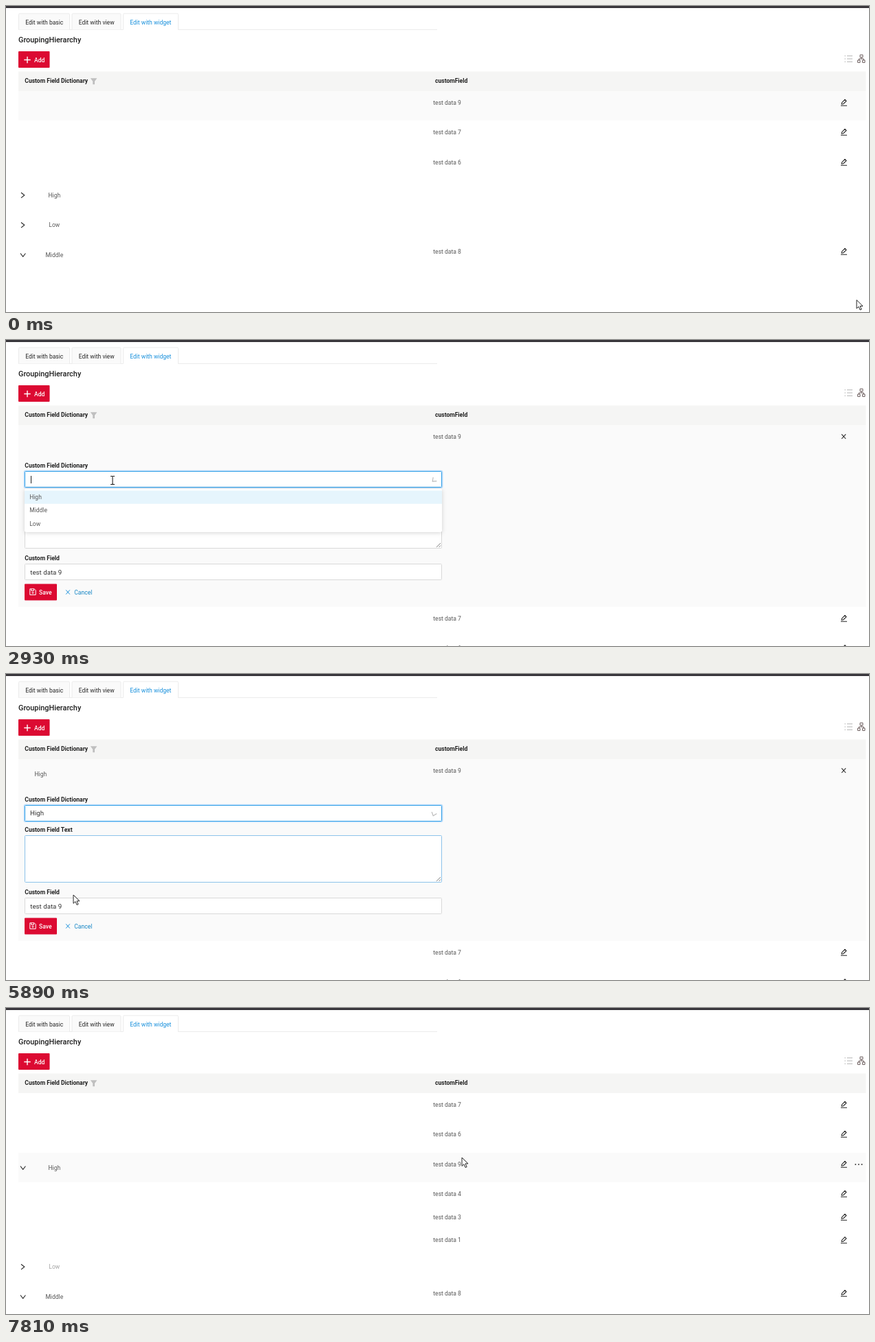
An HTML page that plays this animation: 1255x446 px, repeating every 8 s.

```html
<!DOCTYPE html>
<html lang="en">
<head>
<meta charset="utf-8">
<title>Grouped table inline edit</title>
<style>
  html, body { margin: 0; width: 100%; height: 100%; overflow: hidden; background: #fff; }
  svg { display: block; width: 1255px; height: 446px; font: 8.55px Roboto, sans-serif; }
  text { fill: #595959; white-space: pre; }
  .b { font-weight: 700; fill: #1f1f1f; }
  .d { fill: #262626; }
  .w { fill: #fff; font-weight: 500; }
  .in { font-size: 9.7px; fill: #333; }
  .ln { fill: none; stroke: #262626; stroke-width: 1.1; }
  .box { fill: #fff; stroke: #d9d9d9; }
  #menu { filter: drop-shadow(0 1px 3px rgba(0, 0, 0, .17)); }
</style>
</head>
<body>
<svg id="stage" viewBox="0 0 1255 446" xmlns="http://www.w3.org/2000/svg"></svg>
<script>
const LOOP = 8000, RED = '#dc0a32', BLUE = '#1890dc';
const stage = document.getElementById('stage');

const text = (x, y, s, cls = '', extra = '') => `<text x="${x}" y="${y}" class="${cls}" ${extra}>${s}</text>`;
const rect = (x, y, w, h, fill, extra = '') => `<rect x="${x}" y="${y}" width="${w}" height="${h}" fill="${fill}" ${extra}/>`;
const path = (d, extra = '') => `<path class="ln" d="${d}" ${extra}/>`;
const group = (id, body, extra = '') => `<g id="${id}" ${extra}>${body}</g>`;

const pencil = y => path(`M1214 ${y + 4.5}h9M1215.2 ${y + 2.3}l.5-2.3 4.3-4.3 2 2-4.3 4.3z`, 'stroke-width="1"');
const cross = (x, y, r, extra = '') =>
  path(`M${x - r} ${y - r - .3}L${x + r} ${y + r + .3}M${x + r} ${y - r - .3}L${x - r} ${y + r + .3}`, extra);

// A row: top edge, item number (or 0), group name, open flag
function row([y, n, name, open]) {
  let s = '';
  if (n) s += text(621.3, y + 19.7, 'test data ' + n) + pencil(y + 16.7);
  if (name) {
    const c = y + 21.8;
    s += path(open ? `M21 ${c - 2.3}l3.7 4.8 3.7-4.8` : `M22 ${c - 3.8}l4.8 3.8-4.8 3.8`);
    s += text(70.3, c + 3, name, '', `text-anchor="middle" data-name="${name}"`);
  }
  return s;
}

const before = [[124, 9], [167, 7], [211, 6], [254, 0, 'High'], [297.5, 0, 'Low'], [341, 8, 'Middle', 1]];
const after = [[124, 7], [167, 6], [211, 9, 'High', 1], [254, 4], [288, 3], [321.5, 1], [355.5, 0, 'Low'], [399, 8, 'Middle', 1]];

function tabs() {
  const tab = (x, w, s, on) =>
    `<path d="M${x + .5} 34.5V12.5q0-1.5 1.5-1.5h${w - 4}q1.5 0 1.5 1.5V34.5" fill="${on ? '#fff' : '#fafafa'}" stroke="#ebebeb"/>` +
    text(x + 10.2, 27, s, 'd', on ? `style="fill:${BLUE}"` : '');
  return path('M18 34.5H170.5M250 34.5H627', 'style="stroke:#ebebeb;stroke-width:1"') +
    tab(18, 75, 'Edit with basic') + tab(95.5, 72, 'Edit with view') + tab(170, 81, 'Edit with widget', 1);
}

function toolbar() {
  let list = '';
  for (const y of [72.7, 77, 81.3]) list += `M1219.5 ${y}h1.6M1223 ${y}h8`;
  return rect(18, 66, 45.5, 24, RED, 'rx="1"') +
    path('M26.3 78.5h9.4M31 73.8v9.4', 'style="stroke:#fff;stroke-width:1.4"') + text(41, 81.7, 'Add', 'w') +
    path(list, 'style="stroke:#b5b5b5"') +
    path('M1242 71.2h4v3.6h-4zM1238.6 79h3.4v3.4h-3.4zM1245.6 79h3.4v3.4h-3.4zM1244 75v2M1240.3 79v-2h7v2', 'style="stroke:#6b5c5c;stroke-width:1"') +
    rect(18, 95.5, 1232.5, 28.5, '#f5f5f4') +
    text(27.3, 112, 'Custom Field Dictionary', 'b') + text(624, 112, 'customField', 'b') +
    '<path d="M122.8 105.2h9.6l-3.4 4.6v4.4h-2.8v-4.4z" fill="#bfbfbf"/>';
}

function form() {
  return rect(18, 124, 1232.5, 265, '#fafafa') +
    text(621.3, 143.7, 'test data 9') + cross(1218.2, 140.7, 3) +
    text(50.3, 149, 'High', '', 'id="cell" text-anchor="middle"') +
    text(27.3, 186, 'Custom Field Dictionary', 'b') +
    '<rect id="glow" x="26.5" y="190.7" width="608" height="24.6" rx="2" fill="none" stroke="#1890ff" stroke-opacity=".25" stroke-width="2"/>' +
    '<rect id="select" class="box" x="27.5" y="191.5" width="606" height="23" rx="1"/>' +
    text(35, 206.3, 'High', 'in', 'id="value"') +
    rect(36, 198, 1, 11, '#222', 'id="caret"') +
    path('M-3.8-2.4L0 2.4 3.8-2.4', 'id="arrow" style="stroke:#b8b8b8"') +
    text(27.3, 229.7, 'Custom Field Text', 'b') +
    '<rect id="area" class="box" x="27.5" y="235.5" width="606" height="68" rx="1"/>' +
    path('M626 302l6-6M629.5 302l2.5-2.5', 'style="stroke:#777;stroke-width:.9"') +
    text(27.3, 321, 'Custom Field', 'b') +
    '<rect class="box" x="27.5" y="326.5" width="606" height="23" rx="1"/>' + text(35.3, 342, 'test data 9', 'in') +
    rect(27, 355.5, 47, 24, RED, 'rx="1"') +
    path('M34.8 362.8h6.4l2 2v6.6h-8.4zM36.8 363v2.5h3.6v-2.5', 'style="stroke:#fff;stroke-width:1"') +
    '<circle cx="39" cy="368.4" r="1.1" fill="none" stroke="#fff" stroke-width=".9"/>' +
    text(48, 371.2, 'Save', 'w') +
    cross(90, 367.5, 2.8, `style="stroke:${BLUE};stroke-width:1"`) + text(99.3, 371.4, 'Cancel', '', 'style="fill:#1284c4"') +
    row([389, 7]) + row([432.5, 6]);
}

function menu() {
  return rect(27, 217, 607, 63, '#fff', 'rx="2"') + rect(27, 219.5, 607, 19.3, '#e6f5fd', 'id="active"') +
    ['High', 'Middle', 'Low'].map((s, i) => text(34.2, 232 + i * 19.3, s)).join('');
}

const dots = [0, 1, 2, 3].map(i =>
  `<circle class="dot" cx="${[4.6, 0, -4.6, 0][i]}" cy="${[0, 4.6, 0, -4.6][i]}" r="2.5" fill="#1890dc"/>`).join('');
const pointers =
  group('pArrow', '<path d="M0 0v12.4l2.9-2.7 2.2 4.8 2-.9-2.1-4.7h4z" fill="#fff" stroke="#222" stroke-width="1" stroke-linejoin="round"/>') +
  group('pText', '<path d="M-3-6h2.2l.8.7.8-.7H3M-3 6h2.2l.8-.7.8.7H3M0-5.5v11" fill="none" stroke="#222" stroke-width="1.1"/>') +
  group('pHand', '<path d="M-1.6 1.2q0-1.4 1.3-1.4t1.3 1.4V6.6l.2-1q2-.5 2.2 1 2-.5 2.1.9 1.8-.2 1.8 1.3v4l-1.6 4.7h-7L-5.4 11q-1-1.6.3-2.2t2.2.7l1.3 1.4z" fill="#fff" stroke="#222" stroke-width="1" stroke-linejoin="round"/><path d="M1 6.5v3M3.2 7v3M5.3 8v2.4" stroke="#222" stroke-width=".8"/>');

stage.innerHTML = rect(0, 0, 1255, 446, '#fff') + rect(0, 0, 1255, 3, '#38363b') + tabs() +
  text(18, 53.4, 'GroupingHierarchy', 'b', 'style="font-size:10.9px;font-weight:500"') + toolbar() +
  rect(18, 124, 1232.5, 42.5, '#fafafa', 'id="first"') + rect(18, 0, 1232.5, 43, '#fafafa', 'id="hover"') +
  group('before', before.map(row).join('')) + group('after', after.map(row).join('')) +
  group('more', [-4.6, 0, 4.6].map(x => `<circle cx="${1240 + x}" cy="0" r=".95" fill="#333"/>`).join('')) +
  group('form', form()) + group('menu', menu()) +
  rect(18, 66, 1232.5, 380, '#fff', 'id="veil"') + group('spin', dots) +
  '<circle id="click" r="9.3" fill="#ffff4d" fill-opacity=".72"/>' + group('pointer', pointers);

const el = {};
stage.querySelectorAll('[id]').forEach(n => el[n.id] = n);
const ghost = { High: el.before.querySelector('[data-name=High]'), Low: el.after.querySelector('[data-name=Low]') };
const circles = stage.querySelectorAll('.dot');

const show = (n, on) => n.setAttribute('display', on ? 'inline' : 'none');
const set = (n, k, v) => n.setAttribute(k, v);
const ramp = (t, a, b) => Math.min(1, Math.max(0, (t - a) / (b - a)));
const ease = p => p * p * (3 - 2 * p);
const within = (v, a, b) => v >= a && v < b;

// Pointer path: time, x, y
const track = [
  [30, 1237, 428.5], [500, 1214, 119], [630, 1214, 138], [820, 1214, 138], [850, 1216, 140], [1110, 1216, 140],
  [1160, 1216.5, 145.5], [1700, 1216.5, 145.5], [2390, 300, 363], [2460, 290, 358], [2680, 155, 204.5], [2960, 155, 204.5],
  [3260, 118, 241], [3520, 119, 242], [3860, 119, 242], [3890, 155, 253], [4230, 155, 253], [4590, 125, 217],
  [4860, 125.5, 215.5], [5080, 125.5, 215.5], [5350, 125, 229], [5640, 125, 229], [5890, 98, 322], [6150, 57.5, 370],
  [6700, 57.5, 370], [7040, 324, 303], [7370, 324, 303], [7810, 663, 218]
];
function pointerAt(t) {
  if (t <= track[0][0]) return track[0].slice(1);
  for (let i = 1; i < track.length; i++) {
    const [b, x1, y1] = track[i], [a, x0, y0] = track[i - 1];
    if (t < b) {
      const p = ease(ramp(t, a, b));
      return [x0 + (x1 - x0) * p, y0 + (y1 - y0) * p];
    }
  }
  return track[track.length - 1].slice(1);
}

const OPEN = 2820, PICK = 5620, FORM = 1800, DONE = 6645;

function drawRows(t, y) {
  const rows = t < FORM ? before : after;
  const editing = within(t, FORM, DONE);
  const i = rows.findIndex((r, k) => within(y, r[0], k + 1 < rows.length ? rows[k + 1][0] : r[0] + 43));
  const on = !editing && i >= 0 && t > 30;
  show(el.before, t < FORM);
  show(el.after, t >= DONE);
  show(el.form, editing);
  show(el.first, t < FORM);
  show(el.hover, on);
  show(el.more, on && rows[i][1]);
  if (on) {
    const top = rows[i][0], end = i + 1 < rows.length ? rows[i + 1][0] : top + 43;
    set(el.hover, 'y', top);
    set(el.hover, 'height', end - top);
    set(el.more, 'transform', `translate(0 ${top + 17})`);
  }
  ghost.High.style.fill = t > 400 ? '#b39a80' : '';
  ghost.Low.style.fill = '#a3a3a3';
}

function drawForm(t, x, y) {
  const focus = within(t, 2760, 6300), chosen = t >= PICK;
  show(el.cell, chosen);
  show(el.value, chosen);
  show(el.glow, focus);
  el.select.style.stroke = focus ? '#2f9fe6' : '';
  el.area.style.stroke = within(t, 5720, 6000) ? '#8cc3ea' : '';
  show(el.caret, within(t, 2760, PICK) && (t < OPEN || (t - OPEN) % 1060 < 530));
  const turn = 180 * (ease(ramp(t, OPEN, 3150)) - ease(ramp(t, PICK, 5960)));
  set(el.arrow, 'transform', `translate(622 204.5) rotate(${turn})`);

  const out = 1 - ramp(t, PICK, PICK + 180), grow = 1 - (1 - ramp(t, OPEN - 40, OPEN + 110)) ** 3;
  const open = Math.min(grow, out), scale = .8 + .2 * open;
  show(el.menu, open > 0);
  set(el.menu, 'opacity', open);
  set(el.menu, 'transform', `translate(0 ${217 * (1 - scale)}) scale(1 ${scale})`);
  const k = t < 3120 ? 0 : Math.floor((y - 219.5) / 19.3);
  show(el.active, within(k, 0, 3));
  set(el.active, 'y', 219.5 + 19.3 * k);

  const hand = within(t, OPEN, PICK + 20) && y > 214;
  const overText = within(t, FORM, DONE) && !hand && within(x, 27, 634) &&
    (within(y, 191, 215) || within(y, 235, 304) || within(y, 326, 350));
  show(el.pHand, hand);
  show(el.pText, overText);
  show(el.pArrow, !hand && !overText);
}

function drawVeil(t) {
  const a = Math.min(ramp(t, 1600, 1760), 1 - ramp(t, 1810, 2000)) + Math.min(ramp(t, 6400, 6560), 1 - ramp(t, 6670, 6860));
  const v = Math.max(0, a);
  set(el.veil, 'opacity', .38 * v);
  set(el.spin, 'opacity', v);
  set(el.spin, 'transform', `translate(633.5 187) rotate(${(t - 6600) * .3 + 20})`);
  circles.forEach((c, i) => set(c, 'opacity', .48 + .2 * Math.sin(t / 320 + i * 1.57)));
}

function draw(t) {
  const [x, y] = pointerAt(t);
  drawRows(t, y);
  drawForm(t, x, y);
  drawVeil(t);
  set(el.pointer, 'transform', `translate(${x} ${y})`);
  show(el.click, within(t, 1390, 1590) || within(t, 2690, 2820) || within(t, 5480, PICK) || within(t, 6240, 6400));
  set(el.click, 'cx', x - 1);
  set(el.click, 'cy', y - .5);
}

const start = performance.now();
function tick() {
  draw((performance.now() - start) % LOOP);
  requestAnimationFrame(tick);
}
tick();
</script>
</body>
</html>
```
